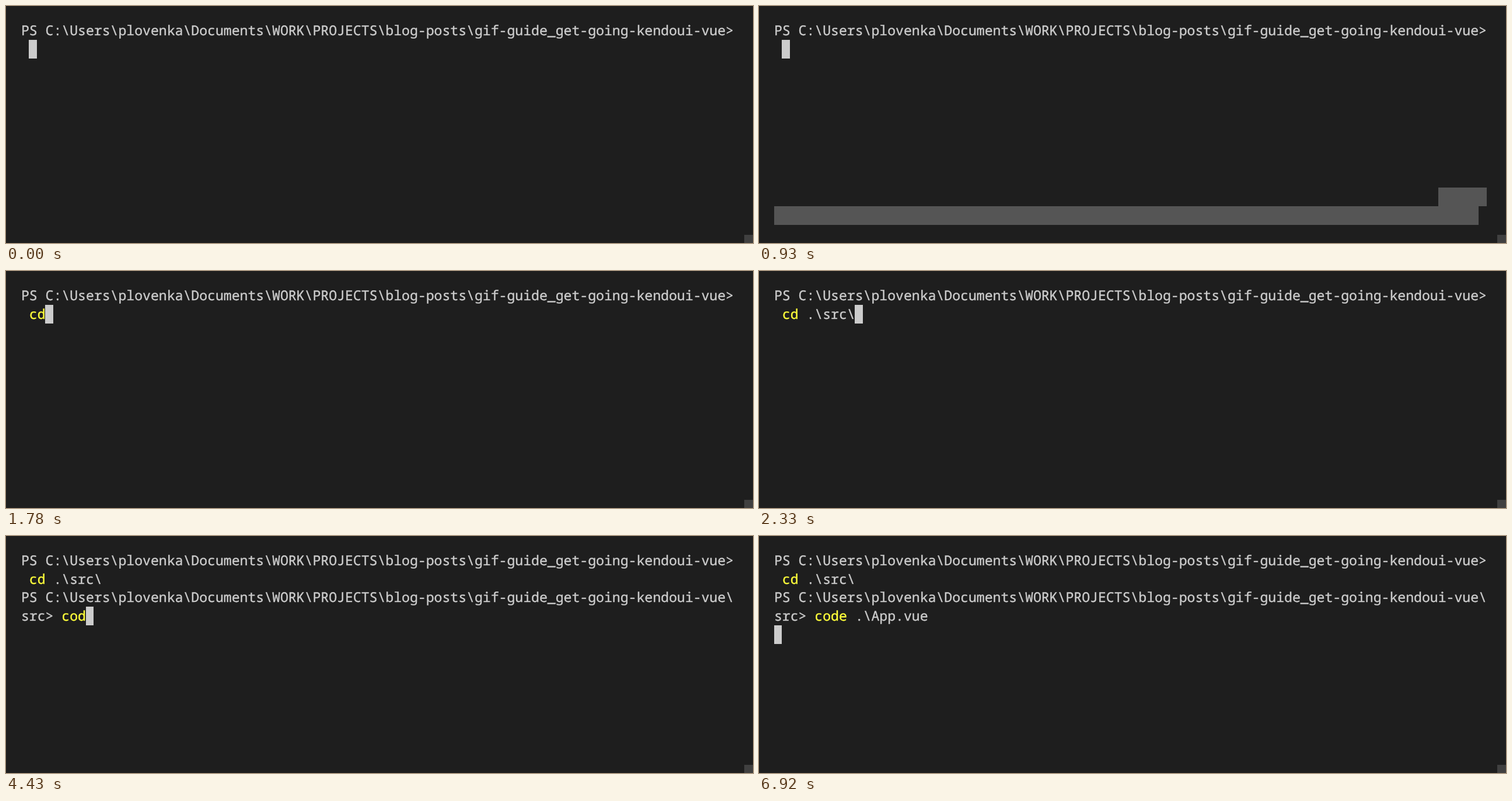
These frames come from a looping animation (1280 px wide and 406 px high, 7320 ms). An HTML page:

```html
<!DOCTYPE html>
<html lang="en">
<head>
<meta charset="utf-8">
<title>Terminal</title>
<style>
  html, body { margin: 0; width: 100%; height: 100%; overflow: hidden; background: #1e1e1e; }
  svg { display: block; width: 1280px; height: 406px; }
  text {
    font: 23.133px "Noto Sans Mono", "DejaVu Sans Mono", monospace;
    font-variant-ligatures: none;
    text-rendering: geometricPrecision;
    white-space: pre;
    fill: #ccc;
    stroke: #ccc;
    stroke-width: 0.4px;
  }
  .cmd { fill: #ffff3a; stroke: #ffff3a; }
  .sel { fill: #555; }
  #cursor { fill: #ccc; }
</style>
</head>
<body>
<svg id="term" viewBox="0 0 1280 406">
  <rect x="1265" y="392" width="15" height="14" fill="#404040"/>
</svg>
<script>
const LOOP = 7320;
const CELL = 13.88, LINE = 31.65, LEFT = 25.5, TOP = 26.35;
const BASE = 23.7, BEARING = 0.4;
const PATH = String.raw`PS C:\Users\plovenka\Documents\WORK\PROJECTS\blog-posts\gif-guide_get-going-kendoui-vue`;

const term = document.getElementById('term');
const colX = c => LEFT + c * CELL;
const rowY = r => TOP + r * LINE;

function add(tag, cls) {
  const el = document.createElementNS('http://www.w3.org/2000/svg', tag);
  if (cls) el.setAttribute('class', cls);
  return term.appendChild(el);
}

function set(el, attrs) {
  for (const k in attrs) el.setAttribute(k, attrs[k]);
}

function label(row, col, str = '', cls) {
  const el = add('text', cls);
  set(el, { x: colX(col) + BEARING, y: Math.round(rowY(row) + BASE) });
  el.textContent = str;
  return el;
}

// Fill whole cells, snapped to pixels
function cells(el, row, from, to) {
  const x = Math.round(colX(from)), y = Math.round(rowY(row));
  set(el, { x, y, width: Math.round(colX(to)) - x, height: Math.round(rowY(row + 1)) - y });
  return el;
}

function show(el, on) {
  el.style.visibility = on ? 'visible' : 'hidden';
}

// Last value whose start time has passed
function at(steps, t) {
  let value = steps[0][1];
  for (const [start, v] of steps) if (t >= start) value = v;
  return value;
}

// A command line: first word highlighted, arguments plain
function prompt(row, col, word, steps) {
  const cmd = label(row, col, '', 'cmd');
  const args = label(row, col + word.length);
  return t => {
    const typed = at(steps, t);
    cmd.textContent = typed.slice(0, word.length);
    args.textContent = typed.slice(word.length);
    return [row, col + typed.length];
  };
}

label(0, 0, PATH + '>');
const next = [label(2, 0, PATH + '\\'), label(3, 0, 'src>')];

const first = prompt(1, 1, 'cd', [
  [0, ''], [1630, 'c'], [1780, 'cd'], [1860, 'cd '],
  [2010, 'cd s'], [2090, 'cd sr'], [2330, 'cd .\\src\\']
]);
const second = prompt(3, 5, 'code', [
  [0, ''], [4060, 'c'], [4300, 'co'], [4430, 'cod'], [4600, 'code'], [5380, 'code '],
  [5590, 'code a'], [5680, 'code ap'], [5910, 'code .\\App.vue']
]);

const selTop = add('rect', 'sel');
const selLow = cells(add('rect', 'sel'), 10, 0, 87);
const cursor = add('rect');
cursor.id = 'cursor';

function draw(t) {
  const wide = t >= 930 && t < 1000;
  cells(selTop, 9, 82, wide ? 88 : 87);
  show(selTop, t >= 780 && t < 1630);
  show(selLow, wide);

  const moved = t >= 3660;
  next.forEach(el => show(el, moved));
  const a = first(t), b = second(t);
  const [row, col] = t >= 6920 ? [4, 0] : moved ? b : a;
  cells(cursor, row, col, col + 1);
}

function tick() {
  draw(performance.now() % LOOP);
  requestAnimationFrame(tick);
}
tick();
</script>
</body>
</html>
```
